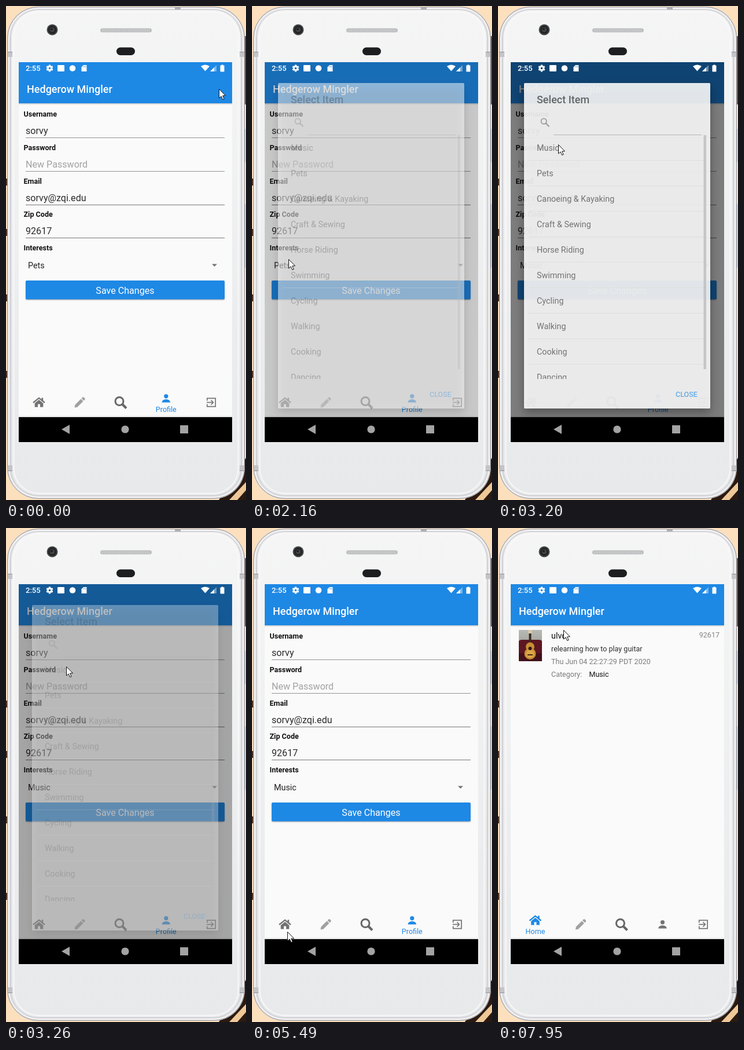
These frames come from a looping animation (415x853 px, 8000 ms). An HTML page with a canvas:

```html
<!DOCTYPE html>
<html lang="en">
<head>
<meta charset="utf-8">
<title>Profile demo</title>
<style>
html, body { margin: 0; width: 100%; height: 100%; overflow: hidden; background: #fce0bd; }
canvas { display: block; }
</style>
</head>
<body>
<canvas id="stage" width="415" height="853"></canvas>
<script>
const c = document.getElementById('stage').getContext('2d');
const LOOP = 8000;
const BLUE = '#1e88e5', GREY = '#737373', PAPER = '#fafafa';
const HOBBIES = ['Music', 'Pets', 'Canoeing & Kayaking', 'Craft & Sewing', 'Horse Riding',
  'Swimming', 'Cycling', 'Walking', 'Cooking', 'Dancing'];

// Progress 0..1 that advances in n equal jumps, the first at start, the last at end.
function stepped(t, start, end, n) {
  const gap = n > 1 ? (end - start) / (n - 1) : 1;
  const i = Math.floor((t - start) / gap + 1e-6) + 1;
  return Math.max(0, Math.min(n, i)) / n;
}
const mix = (a, b, k) => a + (b - a) * k;
const smooth = k => k * k * (3 - 2 * k);

function rect(x, y, w, h, color, r = 0) {
  c.fillStyle = color;
  c.beginPath();
  c.roundRect(x, y, w, h, r);
  c.fill();
}
function outline(x, y, w, h, color, r, lw = 1) {
  c.strokeStyle = color;
  c.lineWidth = lw;
  c.beginPath();
  c.roundRect(x, y, w, h, r);
  c.stroke();
}
function disc(x, y, r, color) {
  c.fillStyle = color;
  c.beginPath();
  c.arc(x, y, r, 0, Math.PI * 2);
  c.fill();
}
function trace(points, closed) {
  c.beginPath();
  points.forEach(([x, y]) => c.lineTo(x, y));
  if (closed) c.closePath();
}
function poly(points, color) {
  trace(points, true);
  c.fillStyle = color;
  c.fill();
}
function line(points, color, lw) {
  trace(points);
  c.strokeStyle = color;
  c.lineWidth = lw;
  c.stroke();
}
function text(str, x, y, size, color, weight = 400, align = 'left') {
  c.font = `${weight} ${size}px Roboto, sans-serif`;
  c.textAlign = align;
  c.fillStyle = color;
  c.fillText(str, x, y);
}
function shadowed(blur, dy, alpha, draw) {
  c.save();
  c.shadowColor = `rgba(0,0,0,${alpha})`;
  c.shadowBlur = blur;
  c.shadowOffsetY = dy;
  draw();
  c.restore();
}
function clipped(x, y, w, h, draw) {
  c.save();
  c.beginPath();
  c.rect(x, y, w, h);
  c.clip();
  draw();
  c.restore();
}
function at(x, y, draw) {
  c.save();
  c.translate(x, y);
  draw();
  c.restore();
}
function vertical(y0, y1, ...colors) {
  const g = c.createLinearGradient(0, y0, 0, y1);
  colors.forEach((color, i) => g.addColorStop(i / (colors.length - 1), color));
  return g;
}

function drawPhone() {
  rect(0, 0, 415, 853, '#fce0bd');
  rect(413, 52, 2, 118, '#7b5032');
  for (const y of [298, 385, 498, 630]) rect(0, y, 2, 12, '#4b3325');
  poly([[368, 853], [415, 780], [415, 853]], '#2b1a10');
  poly([[386, 853], [415, 822], [415, 836], [400, 853]], '#efc898');

  rect(411, 212, 3, 58, '#b9b9be', 1);
  rect(411, 342, 3, 110, '#b9b9be', 1);
  rect(2, 1, 411, 850, '#d9d9dd', 54);
  outline(2.5, 1.5, 410, 849, '#9a9a9f', 54);
  outline(5, 4, 405, 844, '#f4f4f5', 51, 2);
  rect(8, 6, 399, 840, vertical(6, 846, '#f5f5f5', '#f0f1f1', '#ebecee', '#e8e9eb'), 48);
  outline(8.5, 6.5, 398, 839, '#c9c9ce', 48);
  outline(13.5, 10.5, 388, 831, '#f8f8f9', 43, 2);

  for (const x of [3, 404]) {
    rect(x, 79, 8, 9, '#c4c4c9');
    rect(x, 793, 8, 10, '#c4c4c9');
    rect(x, 79, 8, 1, '#8f8f95');
    rect(x, 802, 8, 1, '#8f8f95');
  }
  rect(292, 1, 10, 5, '#aeaeb3');

  disc(80, 41, 9.5, '#4a4a4b');
  disc(80, 41, 7.5, '#242526');
  disc(80, 41, 4, '#414447');
  disc(79, 40, 1.8, '#15171a');
  rect(163, 38.5, 89, 7, '#bdbebf', 3.5);
  for (let x = 166; x < 250; x += 3) rect(x, 40, 1, 4, '#d4d5d5');
  rect(191, 71.5, 32, 13.5, '#1c1e20', 6.7);
}

function drawStatus() {
  const W = '#fff';
  text('2:55', 34, 112, 13, W, 500);
  at(75.5, 107.5, () => {
    for (let i = 0; i < 6; i++) {
      c.rotate(Math.PI / 3);
      rect(-1.7, -6, 3.4, 4, W, .6);
    }
    c.lineWidth = 2.6;
    c.strokeStyle = W;
    c.beginPath();
    c.arc(0, 0, 3.2, 0, 7);
    c.stroke();
  });
  rect(89, 102, 12, 11, W, 1);
  disc(115, 107.5, 5.3, W);
  poly([[134, 102], [139.5, 102], [139.5, 113], [130.5, 113], [130.5, 105.5]], W);
  for (const x of [134, 136, 138]) rect(x - .5, 103.5, 1, 2.5, '#66aeec');

  c.fillStyle = W;
  c.beginPath();
  c.moveTo(344.5, 112.5);
  c.lineTo(337, 104);
  c.quadraticCurveTo(344.5, 99, 352, 104);
  c.fill();
  poly([[353, 113], [364, 102], [364, 113]], 'rgba(255,255,255,.4)');
  poly([[353, 113], [360, 106], [360, 113]], W);
  rect(372.5, 101.5, 3, 2, W);
  rect(370.5, 102.5, 7, 11, W, .8);
}

function drawSystemKeys() {
  const key = '#a3a3a3';
  rect(22, 710, 369, 43, '#000');
  poly([[96, 731], [110, 723], [110, 739]], key);
  disc(206, 731, 6.6, key);
  rect(301, 724, 14, 14, key);
}

function drawCaption(str, y) {
  text(str, 30.5, y, 12.55, '#111', 700);
}

function drawForm(interest, press) {
  const fields = [['Username', 'sorvy'], ['Password', ''], ['Email', 'sorvy@zqi.edu'], ['Zip Code', '92617']];
  fields.forEach(([label, value], i) => {
    const dy = i * 57.75;
    drawCaption(label, 191 + dy);
    text(value || 'New Password', 34, 221 + dy, 16.1, value ? '#2b2b2b' : '#a2a2a2');
    rect(34, Math.round(227 + dy), 344, 1, i > 1 ? '#777' : '#949494');
  });
  drawCaption('Interests', 422);
  text(interest, 38, 453, 14.35, '#222');
  poly([[356, 445.5], [365, 445.5], [360.5, 450]], GREY);

  shadowed(press ? 4 : 2, press ? 2 : 1, .35, () => rect(34, 474, 344, 32.5, BLUE, 2));
  if (press) clipped(34, 474, 344, 32.5, () => disc(183, 490, press, 'rgba(0,0,0,.1)'));
  text('Save Changes', 206, 496.7, 16.1, '#fff', 400, 'center');
}

function drawPost() {
  clipped(36, 176, 40, 54, () => {
    rect(36, 176, 40, 54, vertical(176, 230, '#b7b9b4', '#8e8b86'));
    rect(34, 193, 44, 40, '#5b1722', 7);
    rect(36, 216, 40, 14, '#42101a');
    rect(53.5, 176, 4, 27, '#3c2a20');
    rect(52, 176, 7, 6, '#d8c9a8');
    disc(55.5, 205, 7.5, '#c98e35');
    disc(55.5, 217, 10, '#c98e35');
    disc(55.5, 217, 7, '#dba648');
    disc(55.5, 208, 3, '#2b1a12');
    rect(51, 218, 9, 2, '#4a2b18');
  });
  text('ulvo', 92, 191, 14.35, '#111');
  text('92617', 383, 189, 12.55, '#858585', 400, 'right');
  text('relearning how to play guitar', 92, 213.3, 12.55, '#2f2f2f');
  text('Thu Jun 04 22:27:29 PDT 2020', 92, 235, 12.55, '#7c7c7c');
  text('Category:', 92, 257, 12.55, '#7c7c7c');
  text('Music', 157.5, 257, 12.55, '#111');
}

const icons = {
  home(color) {
    line([[-10, .5], [0, -7.6], [10, .5]], color, 2.3);
    rect(4.5, -8, 2.7, 6, color);
    poly([[0, -4.6], [7.3, 1.4], [7.3, 8], [2, 8], [2, 3], [-2, 3], [-2, 8], [-7.3, 8], [-7.3, 1.4]], color);
  },
  pencil() {
    const color = '#a0a0a0';
    poly([[-9, 9], [-8, 4], [2, -6], [6, -2], [-4, 8]], color);
    poly([[3, -7], [5, -9], [7, -9], [9, -7], [9, -5], [7, -3]], color);
  },
  search(color) {
    c.strokeStyle = color;
    c.lineWidth = 3;
    c.beginPath();
    c.arc(-2, -2, 7, 0, 7);
    c.stroke();
    line([[3, 3], [10, 10]], color, 4);
  },
  person(color) {
    disc(0, -3.7, 3.6, color);
    c.beginPath();
    c.moveTo(-7.2, 7);
    c.bezierCurveTo(-7.2, 0, 7.2, 0, 7.2, 7);
    c.fill();
  },
  exit(color) {
    line([[-7.2, -3], [-7.2, -7.2], [7.2, -7.2], [7.2, 7.2], [-7.2, 7.2], [-7.2, 3]], color, 1.7);
    line([[-8, 0], [3, 0]], color, 1.7);
    line([[-.5, -4], [3.4, 0], [-.5, 4]], color, 1.7);
  }
};

// k = 0: Profile tab active, k = 1: Home tab active.
function drawTabs(k, ripple) {
  rect(22, 707, 369, 2, '#f3f3f3');
  rect(22, 709, 369, 1, '#d0d0d0');
  const homeX = mix(57, 64.5, k), personX = mix(276.8, 284.5, k);
  if (ripple) clipped(22, 600, 369, 110, () => disc(64, 685, ripple, 'rgba(0,0,0,.028)'));
  const homeOn = k >= .5;
  at(homeX, mix(684.5, 677.5, k), () => icons.home(homeOn ? BLUE : GREY));
  at(mix(127.5, 143, k), 684.5, icons.pencil);
  at(mix(198, 213.5, k), 684.5, () => icons.search('#666'));
  at(personX, mix(677.5, 684.5, k), () => icons.person(homeOn ? GREY : BLUE));
  at(355, 684.5, () => icons.exit(GREY));
  c.globalAlpha = homeOn ? k : 1 - k;
  text(homeOn ? 'Home' : 'Profile', homeOn ? homeX : personX, 700.7, 12.55, BLUE, 400, 'center');
  c.globalAlpha = 1;
}

function paintDialog() {
  rect(45, 133, 322, 562, '#fff', 2);
  text('Select Item', 67, 167.5, 18, '#212121', 500);
  c.strokeStyle = GREY;
  c.lineWidth = 1.8;
  c.beginPath();
  c.arc(79.2, 199, 4.7, 0, 7);
  c.stroke();
  line([[82.5, 202.3], [88.5, 208.3]], GREY, 2.2);
  rect(96, 222, 256, 1, '#9a9a9a');
  clipped(45, 223, 322, 421, () => HOBBIES.forEach((name, i) => {
    text(name, 67, 250.2 + i * 44, 14.35, '#333');
    rect(53, 266 + i * 44, 307, 1, '#d9d9d9');
  }));
  rect(355.5, 223, 4.5, 404, '#b3b3b3');
  text('CLOSE', 307, 674.5, 12.55, BLUE, 500);
}
const sheet = document.createElement('canvas').getContext('2d');

function drawDialog(alpha) {
  c.save();
  c.globalAlpha = alpha;
  shadowed(16, 7, .5, () => rect(45, 133, 322, 562, '#fff', 2));
  paintDialog();
  c.restore();
}

// Each move: start, end, jumps, goal x, goal y, optional bend x, y.
const MOVES = [
  [370, 550, 4, 165, 240],
  [920, 1670, 14, 63, 436, 8, 340],
  [1790, 1790, 1, 63, 437],
  [2530, 2830, 6, 104, 239],
  [3380, 3670, 6, 169, 504],
  [3850, 3910, 2, 174, 491],
  [5190, 5490, 6, 61, 697],
  [5730, 5850, 3, 61, 684],
  [7770, 7950, 4, 113, 176]
];
function pointerAt(t) {
  let x = 367.5, y = 143;
  for (const [start, end, n, gx, gy, bx = (x + gx) / 2, by = (y + gy) / 2] of MOVES) {
    if (t < start) break;
    const k = smooth(stepped(t, start, end, n));
    const bend = (a, b, d) => mix(mix(a, b, k), mix(b, d, k), k);
    [x, y] = [bend(x, bx, gx), bend(y, by, gy)];
  }
  return [x, y];
}
function drawPointer(t) {
  const [x, y] = pointerAt(t);
  at(Math.round(x) + .5, Math.round(y) + .5, () => {
    poly([[0, 0], [0, 15.5], [3.6, 12.3], [6.2, 18], [8.7, 17], [6.2, 11.4], [11, 11.2]], '#fff');
    c.strokeStyle = '#111';
    c.lineWidth = 1;
    c.stroke();
  });
}

function dialogState(t) {
  if (t < 2160 || t >= 3320) return null;
  if (t < 2220) return [.2, .3];
  if (t < 2280) return [.45, .8];
  if (t < 3200) return [.6, 1];
  return t < 3260 ? [.5, .65] : [.34, .18];
}

function render(t) {
  drawPhone();
  rect(22, 97, 369, 656, PAPER);
  rect(22, 168, 369, 3, vertical(168, 171, 'rgba(0,0,0,.2)', 'rgba(0,0,0,0)'));
  rect(22, 97, 369, 71, BLUE);
  text('Hedgerow Mingler', 36, 150.2, 18, '#fff', 500);

  const press = t >= 4090 && t < 4390 ? mix(126, 220, (stepped(t, 4090, 4210, 3) - 1 / 3) * 1.5) : 0;
  if (t < 6300) drawForm(t < 3200 ? 'Pets' : 'Music', press);
  else drawPost();

  const swap = stepped(t, 6220, 6460, 4);
  const ripple = t >= 6220 && t < 7770 ? mix(20, 51, swap) : 0;
  drawTabs(smooth(Math.max(0, (swap - .25) / .75)), ripple);

  const dialog = dialogState(t);
  if (dialog) {
    rect(22, 97, 369, 613, `rgba(0,0,0,${dialog[0]})`);
    clipped(22, 97, 369, 613, () => drawDialog(dialog[1]));
  }
  drawStatus();
  drawSystemKeys();
  drawPointer(t);
}

const began = performance.now();
function tick() {
  render((performance.now() - began) % LOOP);
  requestAnimationFrame(tick);
}
tick();
</script>
</body>
</html>
```
